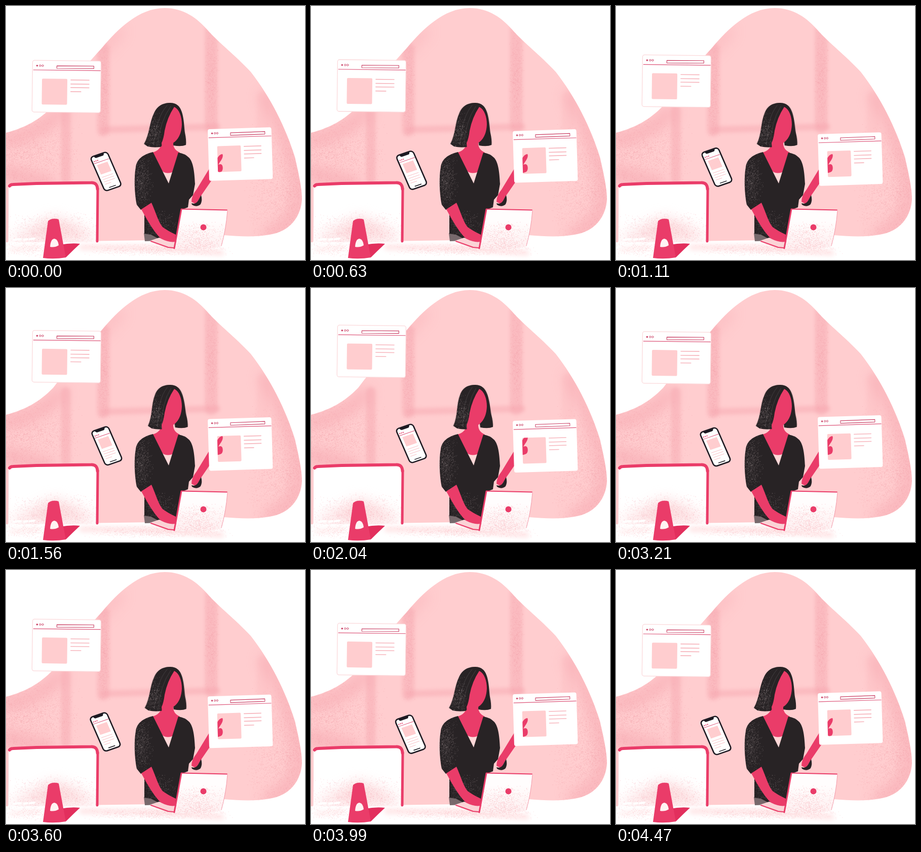
These frames come from a looping animation (590x501 px, 4.5 s). An HTML page with a canvas:

```html
<!DOCTYPE html>
<html lang="en">
<head>
<meta charset="utf-8">
<title>Woman at work with floating screens</title>
<style>
html, body { margin: 0; height: 100%; overflow: hidden; background: #fff; }
canvas { display: block; }
</style>
</head>
<body>
<canvas id="stage" width="590" height="501"></canvas>
<script>
const W = 590, H = 501, LOOP = 4500, STEP = 30;
const RED = '#ea3c69', INK = '#282325', PINK = '#ffcdcf', ROSE = '#f6a3ab';
const stage = document.getElementById('stage').getContext('2d');

let seed = 7;
const rnd = () => (seed = seed * 16807 % 2147483647) / 2147483647;

function layer(paint) {
  const canvas = document.createElement('canvas');
  canvas.width = W;
  canvas.height = H;
  paint(canvas.getContext('2d'));
  return canvas;
}
function fill(c, d, color) {
  c.fillStyle = color;
  c.fill(new Path2D(d));
}
function line(c, d, color, width = 1) {
  c.strokeStyle = color;
  c.lineWidth = width;
  c.lineCap = c.lineJoin = 'round';
  c.stroke(new Path2D(d));
}
function inside(c, d, paint) {
  c.save();
  c.clip(new Path2D(d));
  paint();
  c.restore();
}
function soft(c, blur, paint) {
  c.filter = `blur(${blur}px)`;
  paint();
  c.filter = 'none';
}
// Chalky specks, densest in the middle of an ellipse
function grain(c, n, x, y, rx, ry, color) {
  c.fillStyle = color;
  while (n--) c.fillRect(x + (rnd() + rnd() - 1) * rx, y + (rnd() + rnd() - 1) * ry, 1, 1);
}

const BLOB = 'M0 250C36 241 66 225 93 197C122 158 158 117 189 83C220 46 262 4 313 4C350 4 377 23 400 50' +
  'C422 74 450 95 483 130C522 180 552 240 570 298C579 336 584 362 584 381C582 416 560 445 520 451' +
  'C492 456 464 455 430 452L420 466L0 468Z';
const SCREEN = 'M4 362Q4 351 14 351L168 348Q181 348 181 362L181 466L4 466Z';
const TORSO = 'M290 288C270 293 258 302 256 318C252 340 254 372 258 392L266 402L287 390L273 402L273 449' +
  'L286 451L305 461L335 462L346 402L359 397L361 382L369 373L373 351C372 330 370 308 361 299Q353 291 340 289L321 350Z';
const LID = 'M347 401L437 403Q434 442 425 474Q380 484 331 479Z';
const HAND = 'M406 312L416 302Q421 292 427 292Q430 297 422 308L419 313Q425 310 427 315Q429 321 426 326Q420 331 404 329Z';
const HAIR_LEFT = 'M333 195C319 187 301 193 293 209C282 230 284 251 272 272L279 277Q291 280 305 278' +
  'L318 264L332 199Z';
const HAIR_RIGHT = 'M315 192Q331 189 339 196C351 206 351 234 353 250Q356 264 355 274Q346 278 330 275L325 230Z';
const FACE = 'M332 199C342 204 347 218 347 234Q346 256 334 267L330 270L330 285L308 285L307 270' +
  'Q311 262 313 246Q318 220 332 199Z';

function paintRoom(c) {
  fill(c, BLOB, PINK);
  inside(c, BLOB, () => {
    c.globalAlpha = .42;
    soft(c, 3, () => {
      line(c, 'M192 85L192 245', ROSE, 24);
      line(c, 'M192 244L416 238', ROSE, 13);
      line(c, 'M405 48L405 238', ROSE, 25);
      line(c, 'M118 205L118 342', ROSE, 19);
    });
    c.globalAlpha = .13;
    soft(c, 3, () => line(c, 'M508 180L506 255', ROSE, 24));
    c.globalAlpha = .55;
    soft(c, 13, () => {
      line(c, 'M515 180Q570 280 580 375Q572 430 520 450', ROSE, 28);
      line(c, 'M0 265Q70 250 105 210', ROSE, 28);
      line(c, 'M0 330L80 350', ROSE, 32);
      line(c, 'M185 92L225 50', ROSE, 12);
    });
    c.globalAlpha = .5;
    grain(c, 3200, 555, 360, 85, 140, ROSE);
    grain(c, 2400, 40, 290, 110, 75, ROSE);
    grain(c, 600, 192, 165, 14, 95, ROSE);
    grain(c, 600, 405, 145, 15, 100, ROSE);
    c.globalAlpha = 1;
  });
}

function paintDesk(c) {
  fill(c, 'M0 466L285 462L332 478L425 474L445 489L445 501L0 501Z', '#fff');
  c.globalAlpha = .5;
  soft(c, 5, () => {
    line(c, 'M150 476L290 477L425 487', PINK, 11);
    line(c, 'M10 480L65 476', PINK, 5);
  });
  c.globalAlpha = .6;
  grain(c, 900, 300, 480, 150, 13, '#fbc3c8');
  grain(c, 250, 50, 480, 60, 16, '#fbc3c8');
  c.globalAlpha = 1;
}

function paintMonitor(c) {
  fill(c, SCREEN, '#fff');
  inside(c, SCREEN, () => {
    c.globalAlpha = .65;
    soft(c, 13, () => fill(c, 'M0 462Q50 440 95 415Q150 435 180 462Z', '#fcc9cd'));
    grain(c, 1500, 95, 450, 95, 48, '#f9bfc5');
    c.globalAlpha = 1;
  });
  line(c, 'M7 355Q9 352 14 352L60 350L168 348.5Q180 348 180.5 361', RED, 6);
  line(c, 'M181 360L180 464', RED, 5);
  line(c, 'M5 358L4 464', '#f9c8cd', 1);
  line(c, 'M16 461L29 460M36 461L42 460M47 460L56 459', '#fff', 4);
  fill(c, 'M106 471Q128 467 146 469Q132 482 118 496L103 496Z', '#e22f5d');
  fill(c, 'M83 424Q92 417 104 421L118 496Q95 500 73 497Z', RED);
  fill(c, 'M87 475Q88 459 96 459Q103 461 104 472Q96 477 87 475Z', '#fff3f3');
}

function paintWoman(c) {
  fill(c, 'M272 448L300 452L300 463L274 464Z', '#77696c');
  fill(c, 'M308 320L333 320L321 351Z', '#ffd8d8');
  fill(c, 'M308 268L330 268Q329 283 343 289L333 325Q319 334 307 325L289 289Q306 284 308 268Z', RED);
  fill(c, TORSO, INK);
  inside(c, TORSO, () => {
    grain(c, 700, 266, 345, 25, 55, 'rgba(255,235,235,.2)');
    grain(c, 350, 298, 430, 40, 30, 'rgba(255,235,235,.2)');
  });
  fill(c, 'M366 386Q366 374 376 362L401 321L412 308L416 329L385 374L375 391Z', RED);
  fill(c, 'M366 389Q374 392 379 384L385 373Q388 383 384 391Q376 398 367 392Z', INK);
  fill(c, 'M284 463L302 457L333 465L331 479L318 478Z', '#fbd3d6');
  line(c, 'M286 464L320 476L331 477', RED, 2);
  fill(c, 'M267 401L287 388C295 405 300 425 309 436Q320 444 335 451L334 465Q322 467 306 459Q291 446 267 401Z', RED);
}

function paintLaptop(c) {
  const shade = c.createLinearGradient(0, 425, 0, 480);
  shade.addColorStop(0, '#fffdfd');
  shade.addColorStop(1, '#feeff0');
  fill(c, LID, shade);
  inside(c, LID, () => grain(c, 1000, 380, 470, 60, 48, '#fac6cb'));
  line(c, 'M346 401L332 478', RED, 3);
  line(c, 'M347 400.5L436 402.5', RED, 1.8);
  line(c, 'M437 404Q434 442 425 473', '#f39aaa', 1);
  c.fillStyle = RED;
  c.beginPath();
  c.arc(389.5, 436.5, 6, 0, 7);
  c.fill();
}

const room = layer(paintRoom);
const front = layer(c => [paintDesk, paintWoman, paintLaptop, paintMonitor].forEach(paint => paint(c)));
const hairLeft = layer(c => {
  fill(c, HAIR_LEFT, INK);
  inside(c, HAIR_LEFT, () => {
    grain(c, 300, 288, 248, 20, 42, 'rgba(255,235,235,.25)');
    line(c, 'M318 196Q296 220 291 274M325 198Q303 228 299 275', 'rgba(255,255,255,.12)', 1);
  });
});
const hairRight = layer(c => fill(c, HAIR_RIGHT, INK));

function sway(image, shift) {
  const k = shift / 80;
  stage.save();
  stage.transform(1, 0, k, 1, -k * 194, 0);
  stage.drawImage(image, 0, 0);
  stage.restore();
}

function drawHead(shift) {
  sway(hairRight, shift / 2.2);
  sway(hairLeft, shift);
  fill(stage, FACE, RED);
}

// A browser window; `reveal` paints on top of its picture area
function drawCard(x, y, angle, sx, dy, border, reveal) {
  const c = stage;
  c.save();
  c.translate(x, y);
  c.rotate(angle);
  c.scale(sx, 1);
  c.beginPath();
  c.roundRect(0, 0, 135, 102, 4);
  c.fillStyle = '#fff';
  c.fill();
  if (border) {
    c.strokeStyle = border;
    c.lineWidth = 1.3;
    c.stroke();
  }
  c.translate(0, dy);
  line(c, 'M2 19L134 19', '#dd5579', 1.2);
  line(c, 'M48 10.5L121 10L121 15L48 15.5Z', '#c93e63', 1.1);
  [9, 15, 20].forEach((cx, i) => {
    c.beginPath();
    c.arc(cx, 10.5, 1.7, 0, 7);
    c.fillStyle = c.strokeStyle = '#c93e63';
    c.lineWidth = .9;
    i ? c.stroke() : c.fill();
  });
  line(c, 'M76 38L112 38M76 46L112 46M76 53L112 53M76 61L96 61', '#f7b7be', 1.6);
  c.beginPath();
  c.roundRect(19, 36, 50, 51, 2);
  c.fillStyle = PINK;
  c.fill();
  if (reveal) {
    c.clip();
    c.resetTransform();
    reveal();
  }
  c.restore();
}

function drawPhone(x, y) {
  const c = stage;
  c.save();
  c.transform(.945, -.326, .4, .917, x, y);
  c.beginPath();
  c.roundRect(1, 1, 35, 73, 6);
  c.fillStyle = '#fff';
  c.fill();
  c.strokeStyle = '#1d1a22';
  c.lineWidth = 2.6;
  c.stroke();
  fill(c, 'M8 1L29 1Q28 6 25 6L12 6Q9 6 8 1Z', '#1d1a22');
  line(c, 'M5 11.5h.4M8.5 11.5h.4M12 11.5h.4', RED, 2);
  line(c, 'M3 15.5L34 15.5', '#dd5579', 1);
  fill(c, 'M7 20L29 20L29 40L7 40Z', PINK);
  line(c, 'M7 46L29 46M7 51L29 51M7 56L29 56M7 61L19 61', '#f9c6cb', 1.1);
  line(c, 'M12 69.5L25 69.5', '#1d1a22', 1.4);
  c.restore();
}

// Smooth 0-1-0 swell around a peak time
function swell(t, peak, period = LOOP) {
  const d = Math.min(Math.abs(t - peak), period / 2);
  return (1 + Math.cos(2 * Math.PI * d / period)) / 2;
}

function draw(now) {
  const t = Math.floor(now % LOOP / STEP) * STEP;
  stage.fillStyle = '#fff';
  stage.fillRect(0, 0, W, H);
  stage.drawImage(room, 0, 0);
  drawCard(52.5, 107 - 36 * swell(t, 2345, 3900), .012, 1, 0, '#fbd9db');
  drawPhone(165 + 1.6 * Math.sin(2 * Math.PI * (t - 100) / LOOP), 298 - 20.5 * swell(t, 2310, 4300));
  stage.drawImage(front, 0, 0);
  drawHead(9 * swell(t, 2000));
  drawCard(398, 243 + 19.5 * swell(t, 2230), -.03, .93, -2, null, () => fill(stage, HAND, RED));
  requestAnimationFrame(draw);
}
requestAnimationFrame(draw);
</script>
</body>
</html>
```
